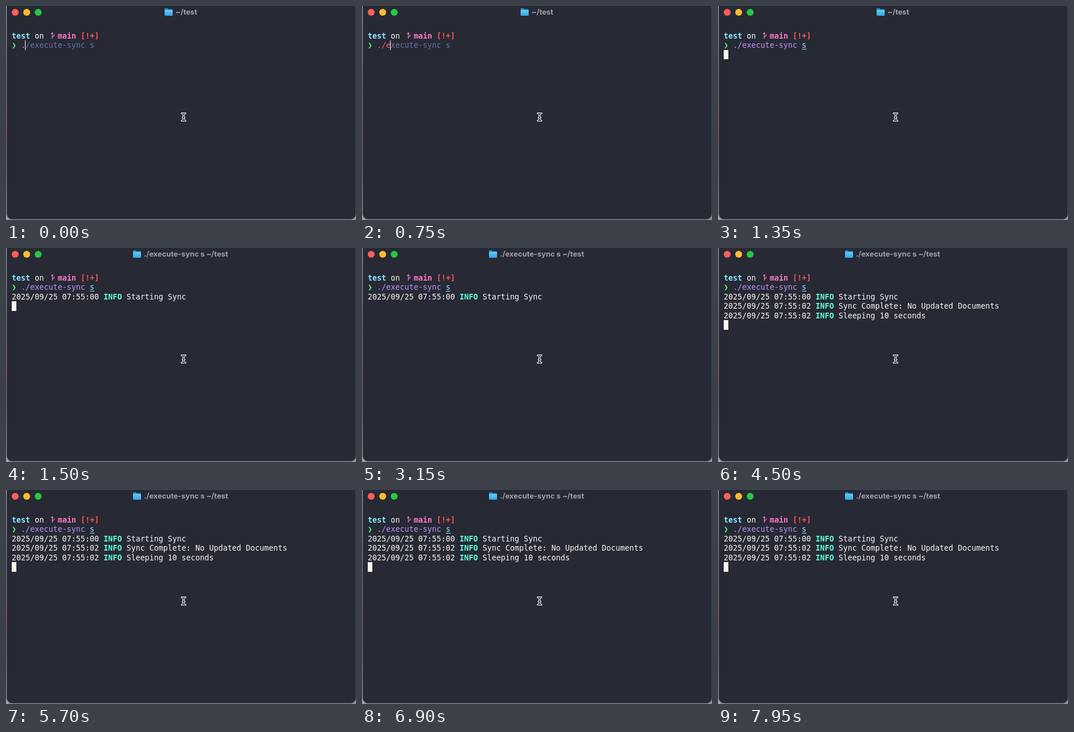
These frames come from a looping animation (609 by 374 pixels, 8000 ms). An HTML page:

```html
<!DOCTYPE html>
<html lang="en">
<head>
<meta charset="utf-8">
<title>Terminal</title>
<style>
html, body { margin: 0; width: 100%; height: 100%; overflow: hidden; background: #8f9092; }
svg { display: block; }
text { font: 13.288px "DejaVu Sans Mono", monospace; fill: #f8f8f2; white-space: pre; }
.b { font-weight: 700; }
.title { font: 700 12.8px Inter, sans-serif; fill: #a0a1a6; }
.cyan { fill: #8be9fd; }
.pink { fill: #ff79c6; }
.red { fill: #ff5555; }
.green { fill: #50fa7b; }
.purple { fill: #bd93f9; }
.ghost { fill: #6272a4; }
.info { fill: #5fffd7; font-weight: 700; }
</style>
</head>
<body>
<svg id="stage" width="609" height="374" viewBox="0 0 609 374">
  <defs>
    <linearGradient id="edge" x1="0" y1="0" x2="0" y2="1">
      <stop offset="0" stop-color="#a3a4a6"/>
      <stop offset=".3" stop-color="#77797f"/>
      <stop offset=".4" stop-color="#75608a"/>
      <stop offset=".47" stop-color="#8f7060"/>
      <stop offset=".62" stop-color="#8a5a60"/>
      <stop offset=".7" stop-color="#75608a"/>
      <stop offset=".8" stop-color="#77797f"/>
      <stop offset="1" stop-color="#a3a4a6"/>
    </linearGradient>
    <linearGradient id="blue" x1="0" y1="0" x2="0" y2="1">
      <stop offset="0" stop-color="#62cdf7"/>
      <stop offset="1" stop-color="#35a5e2"/>
    </linearGradient>
    <g id="folder">
      <path d="M0 5.5q0-1.5 1.5-1.5h3.2l1.6 1.5h6.2q1.5 0 1.5 1.5v8H0z" fill="#2b94cf"/>
      <rect y="7" width="14" height="10" rx="1.3" fill="url(#blue)"/>
    </g>
  </defs>
  <rect width="4" height="374" fill="url(#edge)"/>
  <rect x="1.5" y="-8" width="607" height="380.5" rx="9" fill="#272935" stroke="#484a55"/>
  <circle cx="16" cy="11" r="6" fill="#ff5f57"/>
  <circle cx="36" cy="11" r="6" fill="#febc2e"/>
  <circle cx="56" cy="11" r="6" fill="#28c840"/>

  <text x="10" y="57"><tspan class="b cyan">test</tspan> on</text>
  <path d="M80.5 47v10M80.5 54q3.2-.5 3.2-4.3M78.7 48.7l1.8-2 1.8 2" fill="none" stroke="#ff79c6" stroke-width="1.2"/>
  <text x="90" y="57" class="b"><tspan class="pink">main</tspan> <tspan class="red">[!+]</tspan></text>
  <text x="10" y="73" class="b green">❯</text>
  <g id="live"></g>
  <g fill="none" stroke-linecap="round">
    <path id="beam" d="M306 187.5q3 0 3 2.3v8.4q0 2.300-3 2.300M312 187.500q-3 0-3 2.300M312 200.500q-3 0-3-2.300M307.500 195h3" stroke="#f4f4f4" stroke-width="3"/>
    <use href="#beam"/>
    <path d="M306 187.500q3 0 3 2.300v8.400q0 2.300-3 2.300M312 187.500q-3 0-3 2.300M312 200.500q-3 0-3-2.300M307.500 195h3" stroke="#15161c" stroke-width="1.1"/>
  </g>
</svg>
<script>
const LOOP = 8000;
const live = document.getElementById("live");
const command = "./execute-sync s";

// Adds markup that is visible only during [from, to).
function show(from, to, markup) {
  const g = document.createElementNS("http://www.w3.org/2000/svg", "g");
  g.innerHTML = markup;
  live.append(g);
  const frames = [{ offset: 0, opacity: from ? 0 : 1 }];
  if (from) frames.push({ offset: from / LOOP, opacity: 1 });
  if (to < LOOP) frames.push({ offset: to / LOOP, opacity: 0 });
  frames.push({ offset: 1, opacity: to < LOOP ? 0 : 1 });
  frames.forEach(f => f.easing = "step-end");
  g.animate(frames, { duration: LOOP, iterations: Infinity });
}

const title = (x, label) =>
  `<use href="#folder" x="${x}"/><text class="title" x="${x + 19}" y="15">${label}</text>`;
const log = (y, time, message) =>
  `<text x="10" y="${y}">2025/09/25 ${time} <tspan class="info">INFO</tspan> ${message}</text>`;
const bar = n => `<rect x="${25 + 8 * n}" y="60" width="1" height="17" fill="#f8f8f2"/>`;
const block = (y, h) => `<rect x="10" y="${y}" width="8" height="${h}" fill="#f8f8f2"/>`;
const typed = (n, color) =>
  `<text x="26" y="73"><tspan class="${color}">${command.slice(0, n)}</tspan>` +
  `<tspan class="ghost">${command.slice(n)}</tspan></text>`;

show(0, 1500, title(276, "~/test"));
show(1500, LOOP, title(221, "./execute-sync s ~/test"));

// Typing: start, end, characters, colour
[[0, 150, 1, "purple"], [150, 750, 2, "purple"], [750, 1050, 3, "red"]]
  .forEach(([from, to, n, color]) => show(from, to, typed(n, color)));
show(1050, LOOP,
  `<text x="26" y="73" class="purple">./execute-sync <tspan class="cyan">s</tspan></text>
   <rect x="146" y="75" width="8" height="1" fill="#8be9fd"/>`);

// Bar cursor: start, end, column
[[0, 150, 1], [150, 600, 2], [750, 1050, 3], [1050, 1350, 16]]
  .forEach(([from, to, n]) => show(from, to, bar(n)));

show(1500, LOOP, log(90, "07:55:00", "Starting Sync"));
show(3300, LOOP,
  log(106, "07:55:02", "Sync Complete: No Updated Documents") +
  log(123, "07:55:02", "Sleeping 10 seconds"));

// Block cursor: start, end, top, height
[[1350, 1500, 77, 16], [1500, 1950, 93, 17], [2550, 3150, 93, 17],
 [3300, 3750, 126, 17], [4500, 5100, 126, 17], [5700, 6300, 126, 17],
 [6900, 7500, 126, 17], [7950, LOOP, 126, 17]]
  .forEach(([from, to, y, h]) => show(from, to, block(y, h)));
</script>
</body>
</html>
```
